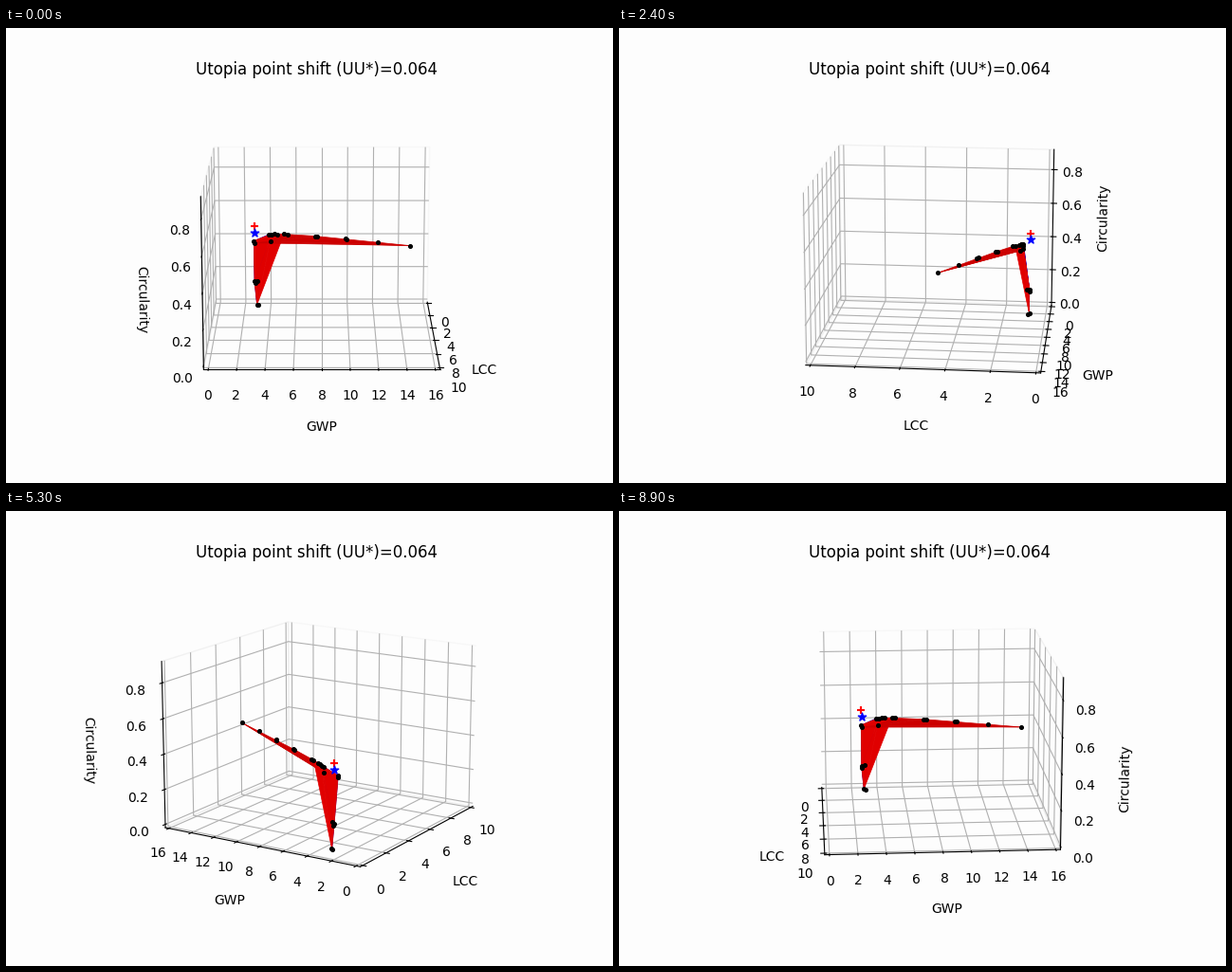
A matplotlib script that plays this animation: 640x480 px, repeating every 9 s.

```python
import matplotlib.pyplot as plt
import numpy as np
from matplotlib.animation import FuncAnimation
from mpl_toolkits.mplot3d.art3d import Poly3DCollection

FRAMES = 90
STEP = 360 / FRAMES
PAPER = "#fdfdfd"
RED, DARK_RED, BLUE = (0.88, 0, 0), (0.8, 0, 0), (0.22, 0, 0.68)

# Pareto solutions: LCC, GWP, circularity
P = {
    "end": (4.425, 14.52, 0.4745),
    "i": (3.66, 12.16, 0.470),
    "h1": (2.95, 9.87, 0.4665),
    "h2": (2.90, 9.78, 0.466),
    "g1": (2.14, 7.46, 0.4585),
    "g2": (2.205, 7.64, 0.459),
    "f1": (1.404, 5.09, 0.447),
    "f2": (1.494, 5.344, 0.448),
    "e1": (1.055, 3.87, 0.433),
    "e2": (1.093, 4.13, 0.437),
    "e3": (1.165, 4.35, 0.440),
    "e4": (1.236, 4.57, 0.4417),
    "d": (1.18, 4.02, 0.3975),
    "a1": (1.10, 2.75, 0.397),
    "a2": (1.13, 2.80, 0.386),
    "b1": (0.78, 2.757, 0.1417),
    "b2": (0.77, 2.80, 0.132),
    "b3": (0.88, 2.98, 0.148),
    "c1": (0.77, 2.93, 0.0),
    "c2": (0.83, 3.03, 0.0),
}

fig = plt.figure(figsize=(6.4, 4.8), dpi=100, facecolor=PAPER)
ax = fig.add_subplot(111, projection="3d", computed_zorder=False,
                     facecolor=PAPER)


def surface(triangles, colors, zorder):
    faces = [[P[k] for k in t.split()] for t in triangles]
    poly = Poly3DCollection(faces, facecolors=colors, edgecolors=colors,
                            linewidths=0.5, zorder=zorder)
    ax.add_collection3d(poly)
    return poly


def padded(top):
    return -top / 48, top + top / 48


wedge = ["c1 b1 e2", "b1 a1 e2", "c1 e2 f1", "a1 a2 d", "a1 d e2", "d e2 f1"]
blade = ["d f1 g1", "d g1 end", "a2 d end"]
surface(wedge + blade, [RED] * len(wedge) + [DARK_RED] * len(blade), 2)
blue = surface(["c1 b1 e1", "b1 a1 e1"], [BLUE] * 2, 1)

ax.scatter(*np.array(list(P.values())).T, c="k", marker=".", s=28,
           depthshade=False, zorder=4)
ax.scatter([0.77], [2.77], [0.4745], c="r", marker="+", s=40,
           depthshade=False, zorder=5)
ax.scatter([0.77], [2.79], [0.4385], c="b", marker="*", s=40,
           depthshade=False, zorder=5)

ax.set_xticks(range(0, 11, 2))
ax.set_yticks(range(0, 17, 2))
ax.set_zticks([0, 0.2, 0.4, 0.6, 0.8])
ax.set(xlim=padded(10), ylim=padded(16), zlim=padded(0.9))
ax.set_xlabel("LCC", labelpad=11)
ax.set_ylabel("GWP", labelpad=11)
ax.set_zlabel("Circularity", labelpad=11)
ax.set_title("Utopia point shift (UU*)=0.064")
for axis in (ax.xaxis, ax.yaxis, ax.zaxis):
    axis.pane.fill = False


def update(i):
    azim = i * STEP
    ax.view_init(elev=15, azim=azim)
    # the blue sheet faces the viewer only from behind
    blue.set_zorder(3 if 100 < azim < 190 else 1)
    return []


anim = FuncAnimation(fig, update, frames=FRAMES, init_func=lambda: [],
                     interval=100, repeat=True, repeat_delay=0)
plt.show()
```
